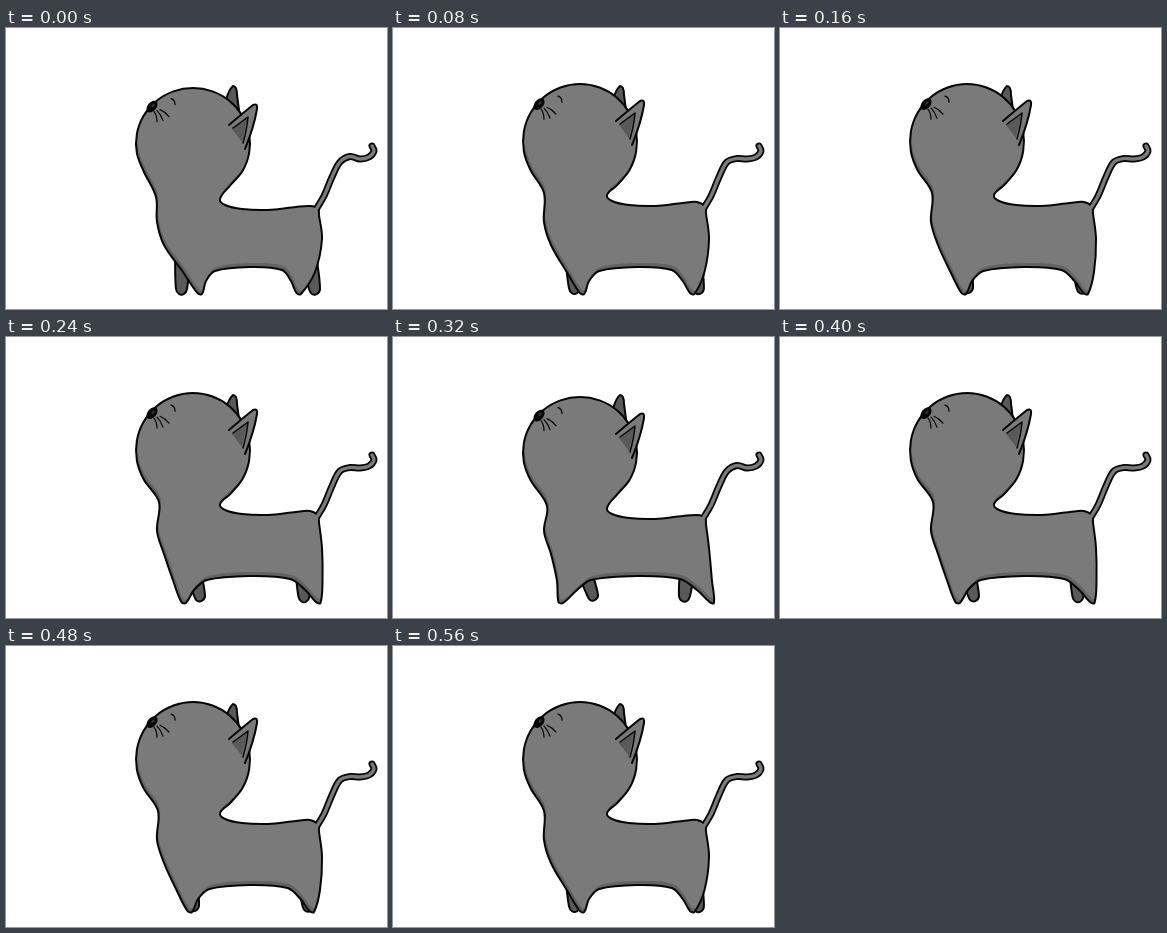
An HTML page with a canvas for the animation above (640 ms loop, 381 px wide and 281 px high).

```html
<!DOCTYPE html>
<html lang="en">
<head>
<meta charset="utf-8">
<title>Walking cat</title>
<style>
html, body { margin: 0; width: 100%; height: 100%; overflow: hidden; background: #fff; }
canvas { display: block; }
</style>
</head>
<body>
<canvas id="stage" width="381" height="281"></canvas>
<script>
const ctx = document.getElementById('stage').getContext('2d');
const STEP = 80, POSES = 8;
const GREY = '#7a7a7a', DARK = '#595959', SHADE = '#636363', INK = '#060606';

const lerp = (a, b, t) => a + (b - a) * t;

// Smooth curve whose handles follow the neighbouring points.
function curve(p, closed) {
  const n = p.length, path = new Path2D();
  const at = i => closed ? p[(i + n) % n] : p[Math.max(0, Math.min(n - 1, i))];
  const dir = i => {
    const [ax, ay] = at(i - 1), [bx, by] = at(i + 1), d = Math.hypot(bx - ax, by - ay) || 1;
    return [(bx - ax) / d, (by - ay) / d];
  };
  path.moveTo(...p[0]);
  for (let i = 0; i < (closed ? n : n - 1); i++) {
    const a = at(i), b = at(i + 1), u = dir(i), v = dir(i + 1);
    const h = Math.hypot(b[0] - a[0], b[1] - a[1]) / 3;
    path.bezierCurveTo(a[0] + u[0] * h, a[1] + u[1] * h, b[0] - v[0] * h, b[1] - v[1] * h, ...b);
  }
  if (closed) path.closePath();
  return path;
}

function paint(path, fill, line = 2) {
  if (fill) { ctx.fillStyle = fill; ctx.fill(path); }
  if (line) { ctx.strokeStyle = INK; ctx.lineWidth = line; ctx.stroke(path); }
}

const paw = (x, y) => [[x - 2.5, y - 1], [x + 2, y]];

function farLeg(hip, x, y) {
  paint(curve([[hip - 9, 232], [x - 5, y - 5], [x - 2, y], [x + 3, y], [x + 6, y - 5], [hip + 6, 232]]), DARK);
}

function skull(bob) {
  const points = [];
  for (let deg = 50; deg >= -210; deg -= 20) {
    const a = deg * Math.PI / 180;
    points.push([187 + 57 * Math.cos(a), 115 + bob * (1 - Math.sin(a)) / 2 + 56 * Math.sin(a)]);
  }
  return points;
}

// gather: 0 with the near legs apart, 1 with them drawn together
function outline(gather, bob) {
  const by = (a, b) => lerp(a, b, gather);
  const chest = [[by(154, 150), 168 + bob], [151, 194], [158, 217], [by(164, 177), 244]];
  const belly = [[by(184, 200), 253], [by(198, 209), 243], [244, 239], [by(287, 276), 242], [by(304, 285), 253]];
  const rump = [[by(319, 309), 244], [316, 211], [313, 187 + bob / 2], [312, 180 + bob / 2]];
  const back = [[304, 177], [290, 178], [262, 181], [236, 180], [219, 176], [214, 170]];
  return curve([
    ...chest, ...paw(lerp(168, 194, gather ** 0.7), 266),
    ...belly, ...paw(by(319, 293), 266),
    ...rump, ...back.map(([x, y]) => [x, y + bob]), ...skull(bob)
  ], true);
}

function drawTail(bob, width, color) {
  const hump = 130.5 - (bob + 3) / 2;
  ctx.strokeStyle = color;
  ctx.lineWidth = width;
  ctx.stroke(curve([[309, 183], [318, 168], [326, 149], [334, 134], [344, hump],
    [354, 131], [363, 129], [368, 123], [366, 118]]));
}

function drawNearEar(bob) {
  ctx.save();
  ctx.translate(0, bob);
  paint(new Path2D('M223 96 Q237 84 247 76 Q252 74 251 80 Q248 98 239 120'), GREY);
  paint(new Path2D('M226 100 L242 88 L236 113 Z'), DARK, 0);
  paint(new Path2D('M227 99 L242 88 Q241 100 237 114'), null, 1.5);
  ctx.restore();
}

function drawFace(bob) {
  const ellipse = (x, y, rx, ry, fill) => {
    const path = new Path2D();
    path.ellipse(x, y, rx, ry, -0.85, 0, 7);
    paint(path, fill, 0);
  };
  ctx.save();
  ctx.translate(146, 78 + bob * 0.6);
  ellipse(0, 0, 6.8, 4.4, INK);
  ellipse(1, -1, 2.2, 1.1, '#30343c');
  paint(new Path2D('M2 5 Q5 9 5 15 M5 4 Q9 8 11 14 M8 3 Q13 5 17 10'), null, 1.2);
  paint(new Path2D('M19 -8 Q23 -7 23 -2'), null, 1.3);
  ctx.restore();
}

function drawCat(step) {
  const gather = Math.abs(step - POSES / 2) / (POSES / 2);
  const bob = step % 4 ? -3 : 1;
  ctx.clearRect(0, 0, 381, 281);
  ctx.lineJoin = ctx.lineCap = 'round';

  paint(new Path2D('M220 72 Q223 61 227 58 Q231 58 231 67 L233 82'), DARK);
  farLeg(lerp(192, 178, gather), lerp(199, 175, gather), lerp(263, 266, gather));
  farLeg(lerp(296, 305, gather), lerp(291, 308, gather ** 0.7), lerp(264, 266, gather));
  drawTail(bob, 7, INK);

  const body = outline(gather, bob);
  paint(body, SHADE, 0);
  ctx.save();
  ctx.clip(body);
  ctx.translate(1.5, -4);
  paint(body, GREY, 0);
  ctx.restore();
  paint(body);

  drawTail(bob, 3.4, GREY);
  drawNearEar(bob);
  drawFace(bob);
}

const start = performance.now();
function tick() {
  drawCat(Math.floor((performance.now() - start) / STEP) % POSES);
  requestAnimationFrame(tick);
}
tick();
</script>
</body>
</html>
```
